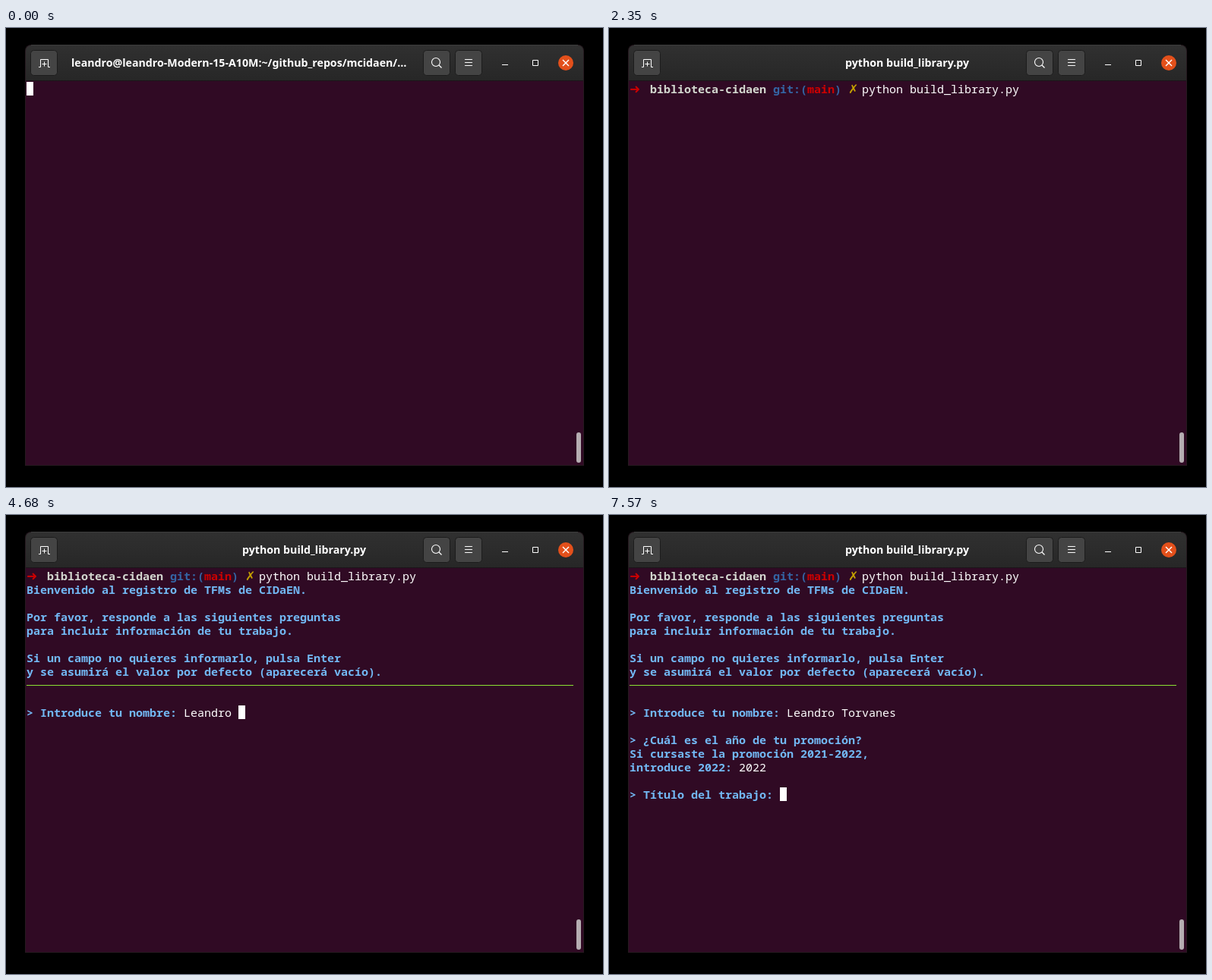
Recreate the animation shown at these times as an HTML page with a canvas. Size 786 px wide and 605 px high, loop 8 s.

```html
<!DOCTYPE html>
<html lang="es">
<head>
<meta charset="utf-8">
<title>Terminal</title>
<style>
  html, body { margin: 0; width: 100%; height: 100%; overflow: hidden; background: #000; }
  canvas { display: block; }
</style>
</head>
<body>
<canvas id="stage" width="786" height="605"></canvas>
<script>
const ctx = document.getElementById('stage').getContext('2d');
const LOOP = 8000;
const CELL = { x: 27, y: 71, w: 9, h: 18, base: 15 };
const MONO = '15px "Noto Sans Mono", "DejaVu Sans Mono", monospace';
const SYMBOL = '"DejaVu Sans", sans-serif';
const TITLE = 'bold 14.2px "Noto Sans", "Open Sans", sans-serif';
const COLOR = {
  bg: '#300a24', white: '#ffffff', info: '#72b8f4', red: '#cc0000', blue: '#3465a4',
  yellow: '#c4a000', grey: '#d3d7cf', ghost: '#555753', rule: '#8ae234'
};

const COMMAND = 'python build_library.py';
const NAME = 'Leandro Torvanes';
const YEAR = '2022';

// Moments at which each further character appears
const COMMAND_KEYS = [870, 1260, 1440, 1600];
const NAME_KEYS = [3220, 3430, 3540, 3640, 3790, 4420, 4570, 4680, 4890,
                   5080, 5180, 5280, 5370, 5460, 5550, 5640];
const YEAR_KEYS = [6700, 6920, 7050, 7170];

// [start, row, text]
const MESSAGES = [
  [2490, 1, 'Bienvenido al registro de TFMs de CIDaEN.'],
  [2590, 3, 'Por favor, responde a las siguientes preguntas'],
  [2590, 4, 'para incluir información de tu trabajo.'],
  [2590, 6, 'Si un campo no quieres informarlo, pulsa Enter'],
  [2590, 7, 'y se asumirá el valor por defecto (aparecerá vacío).'],
  [3220, 10, '> Introduce tu nombre: '],
  [6120, 12, '> ¿Cuál es el año de tu promoción?'],
  [6120, 13, 'Si cursaste la promoción 2021-2022,'],
  [6120, 14, 'introduce 2022: '],
  [7470, 16, '> Título del trabajo: ']
];

const countKeys = (keys, t) => keys.filter(k => k <= t).length;

function box(x, y, w, h, radius, fill, stroke) {
  ctx.beginPath();
  ctx.roundRect(x, y, w, h, radius);
  if (fill) { ctx.fillStyle = fill; ctx.fill(); }
  if (stroke) { ctx.strokeStyle = stroke; ctx.lineWidth = 1; ctx.stroke(); }
}

function line(points, color = '#fff', width = 1) {
  ctx.beginPath();
  points.forEach(([x, y], i) => i ? ctx.lineTo(x, y) : ctx.moveTo(x, y));
  ctx.strokeStyle = color;
  ctx.lineWidth = width;
  ctx.stroke();
}

function print(text, col, row, color, bold = false, font = MONO) {
  ctx.font = (bold ? 'bold ' : '') + font;
  ctx.fillStyle = color;
  ctx.fillText(text, CELL.x + col * CELL.w, CELL.y + row * CELL.h + CELL.base);
}

function cursor(col, row, under = '') {
  ctx.fillStyle = COLOR.white;
  ctx.fillRect(CELL.x + col * CELL.w, CELL.y + row * CELL.h, CELL.w, CELL.h);
  print(under, col, row, COLOR.bg);
}

function drawIcons() {
  for (const x of [33, 550, 592]) box(x - 0.5, 29.5, 35, 33, 4, '#444444', '#1c1c1c');

  // New tab
  line([[43, 51.5], [45.5, 51.5], [45.5, 41.5], [55.5, 41.5], [55.5, 51.5], [58, 51.5]]);
  line([[47.5, 47.5], [53.5, 47.5]]);
  line([[50.5, 44.5], [50.5, 50.5]]);

  // Search
  ctx.beginPath();
  ctx.arc(566, 45, 5.5, 0, Math.PI * 2);
  ctx.strokeStyle = '#fff';
  ctx.lineWidth = 1.1;
  ctx.stroke();
  line([[570, 49], [573.5, 52.5]], '#fff', 1.2);

  // Menu
  for (const y of [41.5, 45.5, 49.5]) line([[604, y], [614, y]]);

  // Window controls
  line([[653, 48.5], [661, 48.5]]);
  box(693.5, 42.5, 7, 7, 0, null, '#fff');
  box(727, 36, 20, 20, 10, '#e3501b');
  line([[733, 42], [741, 50]], '#fff', 1.4);
  line([[741, 42], [733, 50]], '#fff', 1.4);
}

function drawWindow(t) {
  ctx.fillStyle = '#000';
  ctx.fillRect(0, 0, 786, 605);
  box(25, 22, 736, 555, [8, 8, 0, 0], '#25191f');
  const header = ctx.createLinearGradient(0, 23, 0, 69);
  header.addColorStop(0, '#303030');
  header.addColorStop(1, '#272727');
  box(26, 23, 734, 46, [7, 7, 0, 0], header);
  line([[33, 22.5], [753, 22.5]], '#3c3c3c');
  line([[26, 69.5], [760, 69.5]], '#1b1519');
  ctx.fillStyle = COLOR.bg;
  ctx.fillRect(26, 70, 734, 506);
  box(751, 533, 6, 40, 3, '#b5adb1');
  drawIcons();

  ctx.font = TITLE;
  ctx.fillStyle = '#fff';
  if (t < 2350) {
    ctx.fillText('leandro@leandro-Modern-15-A10M:~/github_repos/mcidaen/…', 86, 51);
  } else {
    ctx.textAlign = 'center';
    ctx.fillText(COMMAND, 392.5, 51);
    ctx.textAlign = 'left';
  }
}

function drawPrompt(t) {
  if (t < 30) return cursor(0, 0);
  print('➜', 0, 0, COLOR.red, true, '17px ' + SYMBOL);
  print('biblioteca-cidaen', 3, 0, COLOR.grey, true);
  print('git:(', 21, 0, COLOR.blue, true);
  print('main', 26, 0, COLOR.red, true);
  print(')', 30, 0, COLOR.blue, true);
  print('✗', 32, 0, COLOR.yellow, true, '16px ' + SYMBOL);

  const typed = t < 1940 ? countKeys(COMMAND_KEYS, t) : COMMAND.length;
  const hint = t >= 970 ? COMMAND.slice(typed) : '';
  print(COMMAND.slice(0, typed), 34, 0, COLOR.white);
  print(hint, 34 + typed, 0, COLOR.ghost);
  if (t < 2250) cursor(34 + typed, 0, hint.charAt(0));
}

function drawSession(t) {
  for (const [start, row, text] of MESSAGES) {
    if (t >= start) print(text, 0, row, COLOR.info, true);
  }
  if (t >= 3220) line([[27, 224.5], [747, 224.5]], COLOR.rule);

  const nameLength = countKeys(NAME_KEYS, t);
  const yearLength = countKeys(YEAR_KEYS, t);
  print(NAME.slice(0, nameLength), 23, 10, COLOR.white);
  print(YEAR.slice(0, yearLength), 16, 14, COLOR.white);

  if (t >= 3790 && t < 5550) cursor(23 + nameLength, 10);
  if (t >= 6920 && t < 7370) cursor(16 + yearLength, 14);
  if (t >= 7570) cursor(22, 16);
}

const startTime = performance.now();

function frame() {
  const t = (performance.now() - startTime) % LOOP;
  drawWindow(t);
  drawPrompt(t);
  drawSession(t);
  requestAnimationFrame(frame);
}
frame();
</script>
</body>
</html>
```
